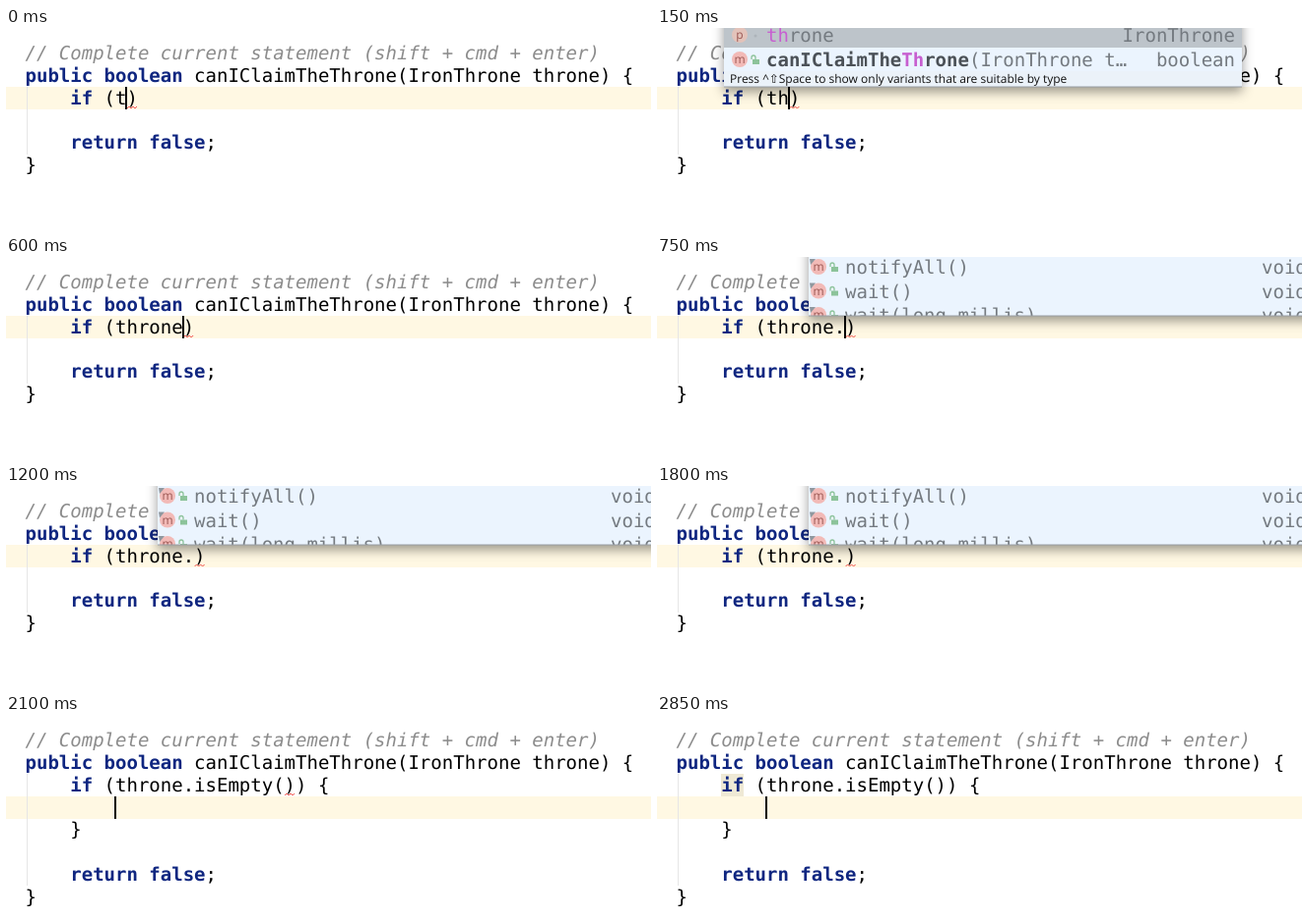
An HTML page for the animation above (3000 ms loop, 655 by 205 pixels).

```html
<!DOCTYPE html>
<html lang="en">
<head>
<meta charset="utf-8">
<title>Complete current statement</title>
<style>
  html, body { margin: 0; width: 100%; height: 100%; overflow: hidden; background: #fff; }
  svg { display: block; }
  text { font: 19px "DejaVu Sans Mono", monospace; white-space: pre; text-rendering: geometricPrecision; }
  .key { font-weight: bold; fill: #0f2680; }
  .note { font-style: italic; fill: #8c8c8c; }
  .name { font-weight: bold; fill: #4b5157; }
  .soft { fill: #747a80; }
  .hit { fill: #c75fd0; }
  .hint { font: 12px "Open Sans", sans-serif; fill: #111; }
  .letter { font: 12px "Open Sans", sans-serif; fill: #9b5753; text-anchor: middle; }
  .end { text-anchor: end; }
  .shadow { filter: drop-shadow(0 5px 6px rgba(0, 0, 0, .4)); }
</style>
</head>
<body>
<svg id="stage" width="655" height="205" viewBox="0 0 655 205"></svg>
<script>
const stage = document.getElementById("stage");
const LOOP = 3000;
const colX = col => 19.5 + col * 11.44;
const lineY = line => 32 + line * 22.85;

const rect = (x, y, w, h, fill, more = "") =>
  `<rect x="${x}" y="${y}" width="${w}" height="${h}" fill="${fill}" ${more}/>`;
const text = (x, y, body, cls = "") => `<text x="${x}" y="${y}" class="${cls}">${body}</text>`;
const span = (cls, body) => `<tspan class="${cls}">${body}</tspan>`;
const code = (col, line, body, cls) => text(colX(col), lineY(line), body, cls);

const caret = (col, y) => rect(Math.round(colX(col) - 1), y, 2, 23, "#000");
const squiggle = col =>
  `<path d="M${colX(col) + .5} 82l2-2 2 2 2-2 2 2 2-2" fill="none" stroke="#f0504a" stroke-width="1"/>`;

const disc = (x, y, letter, fill) =>
  `<circle cx="${x}" cy="${y}" r="8" fill="${fill}"/>` + text(x, y + 4, letter, "letter");
const lock = (x, y) => rect(x - 3, y - 1, 7, 5, "#8cc39a") +
  `<path d="M${x - 4} ${y - 1}v-2a2 2 0 0 1 4 0v2" fill="none" stroke="#8cc39a" stroke-width="1.3"/>`;
const method = (x, y) => disc(x, y, "m", "#f2bab7") + lock(x + 16, y + 1);

// The nested svg clips rows to the popup's box.
const popup = (x, w, rows) =>
  rect(x, -40, w, 100, "#ebf4fe", 'class="shadow"') +
  `<svg width="${x + w}" height="60">${rows}</svg>` +
  rect(x, 59.5, w, 1, "#9aa0a6");

function variants(typed) {
  const n = typed.length, rest = "throne".slice(n);
  return popup(68, 526,
    rect(68, 0, 526, 20, "#bdc4ca") +
    disc(84, 7, "p", "#e3c3ba") +
    `<circle cx="100" cy="8" r="1.5" fill="#adb4ba"/>` +
    text(111, 14, span("hit", typed) + span("soft", rest)) +
    text(587, 14, "IronThrone", "soft end") +
    method(84, 32) +
    text(111, 38.5, span("name", "canIClaimThe") +
      `<tspan class="hit" font-weight="bold" style="font-weight:bold">${"Throne".slice(0, n)}</tspan>` +
      span("name", rest) + span("soft", "(IronThrone t…")) +
    text(587, 38.5, "boolean", "soft end") +
    rect(68, 44, 526, 16, "#ebf2f9") +
    text(74, 56, "Press ^⇧Space to show only variants that are suitable by type", "hint"));
}

const members = () => popup(154, 520,
  ["notifyAll()", "wait()", "wait(long millis)"].map((label, i) => {
    const y = 17 + i * 24.5;
    return method(164, y - 7) +
      `<path d="M155 ${y - 15}h6l-5 6z" fill="#8f979e"/>` +
      text(191, y, label, "soft") + text(614, y, "void", "soft");
  }).join(""));

const header = () =>
  code(0, 0, "// Complete current statement (shift + cmd + enter)", "note") +
  code(0, 1, span("key", "public boolean") + " canIClaimTheThrone(IronThrone throne) {");

const ending = line =>
  code(4, line, span("key", "return false") + ";") + code(0, line + 1, "}");

const guide = bottom => rect(21, 60, 1, bottom - 60, "#e6e6e6");
const caretRow = y => rect(0, y, 655, 23, "#fff8e3");

function typing(t) {
  const typed = "t,th,thro,thron,throne,throne.".split(",")[Math.min(5, Math.floor(t / 150))];
  const end = 8 + typed.length;
  const blinkOff = t >= 1200 && t < 1500 || t >= 1800;
  return caretRow(60) + guide(129) + header() +
    code(4, 2, span("key", "if") + ` (${typed})`) + squiggle(end) + ending(4) +
    (t >= 150 && t < 600 ? variants(typed) : "") +
    (t >= 750 && t < 1950 ? members() : "") +
    (blinkOff ? "" : caret(end, 60));
}

function completed(t) {
  const settled = t >= 2400;
  return caretRow(83) + guide(174) +
    (settled ? rect(65, 60, 23, 23, "#efe9d5") : "") + header() +
    code(4, 2, span("key", "if") + " (throne.isEmpty()) {") +
    (settled ? "" : squiggle(23)) +
    code(4, 4, "}") + ending(6) + caret(8, 83);
}

let shown = "";
function draw(now) {
  const t = now % LOOP;
  const next = t < 2100 ? typing(t) : completed(t);
  if (next !== shown) stage.innerHTML = shown = next;
  requestAnimationFrame(draw);
}
draw(0);
</script>
</body>
</html>
```
